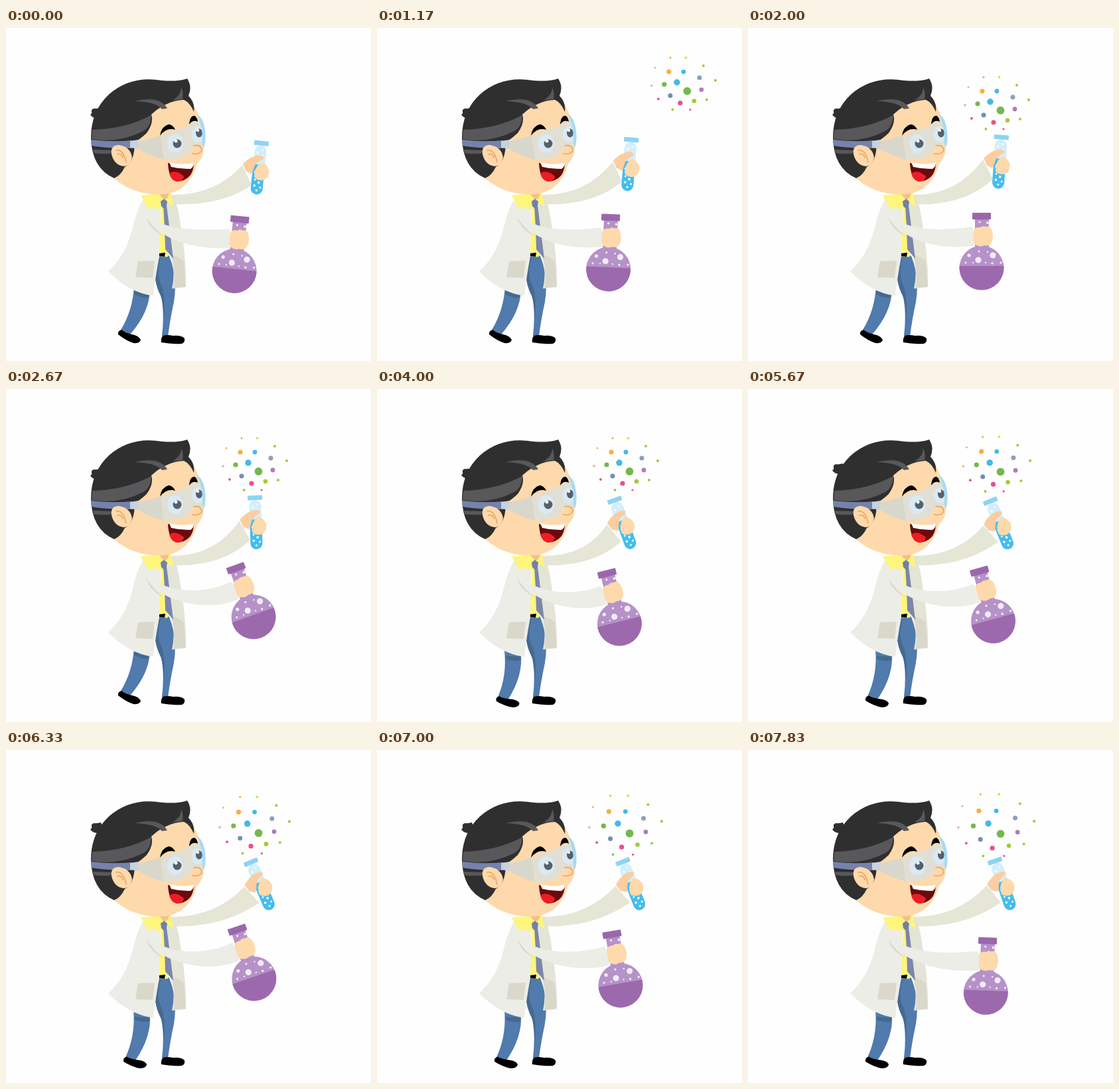
These frames come from a looping animation (550 px wide and 501 px high, 8000 ms). An HTML page:

```html
<!DOCTYPE html>
<html lang="en">
<head>
<meta charset="utf-8">
<title>Scientist</title>
<style>
  html, body { margin: 0; width: 100%; height: 100%; overflow: hidden; background: #fefefe; }
  svg { display: block; width: 100vw; height: 100vh; }
  .skin { fill: #fed9ab; }
  .hair { fill: #2f2f30; }
  .streak { fill: #58585a; }
  .coat { fill: #ecede6; }
  .fold { fill: #d9d8cb; }
  .jeans { fill: #517aad; }
  .line { fill: none; stroke: #e9a45c; stroke-width: 1.6; stroke-linecap: round; }
</style>
</head>
<body>
<svg viewBox="0 0 550 501">
  <g id="backLeg">
    <path class="jeans" d="M193 388L217 394Q216 428 187 461L173 454Q191 425 193 388Z"/>
    <path fill="#46698f" d="M193 396L216 400L214 406Q202 406 193 400Z"/>
    <path d="M174 454Q168 456 169 461Q180 470 192 474Q202 475 203 469Q200 463 190 461Q181 459 174 454Z"/>
  </g>
  <path class="jeans" d="M228 343Q238 338 246 343Q259 375 253 412Q247 440 244 464L235 463Q239 430 234 405Q226 390 224 370Z"/>
  <path fill="#46698f" d="M229 346L233 346Q225 372 235 389Q241 410 238 440Q238 415 233 402Q224 385 225 370Z"/>
  <path d="M236 463Q233 468 234 473Q250 476 265 475Q270 473 269 467Q264 462 252 463Q243 461 236 463Z"/>

  <path id="backArm" fill="#e6e6d7"/>

  <g id="tube">
    <rect x="-13" y="-38" width="18" height="74" rx="9" fill="#d3eefb"/>
    <path fill="#45bdee" d="M-13 -9H5V27A9 9 0 0 1 -13 27Z"/>
    <rect x="-15" y="-45" width="22" height="7" rx="1" fill="#8dd3f4"/>
    <g id="tubeBubbles" fill="#fff"></g>
  </g>
  <g id="tubeHand">
    <path fill="#fbcda0" d="M-28 -9Q-15 -24 0 -23Q5 -21 1 -17Q-10 -12 -11 -4Q-12 2 -15 6Q-18 3 -23 2Z"/>
    <path class="skin" d="M-8 -3Q-7 -8 0 -13Q8 -11 12 -1Q12 12 3 14Q-5 15 -9 11Q-11 7 -9 4Q-11 0 -8 -3Z"/>
  </g>

  <path fill="#e4e4d7" d="M242 256L251 251Q259 262 264 303Q272 350 271 390L250 392Q256 365 248 343Z"/>
  <path class="fold" d="M249 341Q262 345 268 351L271 389L253 391Q256 365 249 341Z"/>
  <path fill="#fef57b" d="M205 253L248 247L253 268L242 263L244 344Q235 345 230 342L234 272L212 272Z"/>
  <path class="coat" d="M208 256Q198 270 191 300Q181 342 154 366Q185 398 222 403Q225 375 231 344L233 272L226 272Z"/>
  <path fill="#fef57b" d="M203 252L215 273L238 257L251 267L247 248Z"/>
  <path fill="#f3c089" d="M227 246L246 246Q245 258 238 258Z"/>
  <path d="M231 339L240 338L239 344L231 343Z"/>
  <path fill="#7b86ab" d="M237 266H242L252 347L240 333L239 300Z"/>
  <path fill="#7180a8" d="M233 261L238 257L243 261L242 268L238 272L234 268Z"/>
  <path class="fold" d="M199 351L224 350L221 376L195 375Z"/>

  <path id="tuft" class="hair" d="M143 120Q135 122 133 121Q128 122 129 126Q130 129 127 130Q129 135 137 136L147 132Z"/>
  <path class="skin" d="M163 226Q180 242 206 248Q235 254 255 246Q279 236 288 204Q299 193 298 178Q298 140 281 112Q262 98 230 112L180 165Z"/>
  <path class="hair" d="M163 226Q129 211 128 165Q128 125 155 100Q188 71 235 79Q262 81 273 76Q281 88 275 102Q285 112 283 126Q277 112 268 108Q242 109 219 130Q223 143 212 158Q200 169 194 171Q194 202 179 209Q173 222 163 226Z"/>
  <path class="streak" d="M130 153Q180 152 219 131Q218 149 207 155Q170 174 129 167Z"/>
  <path class="streak" d="M194 110Q232 101 243 121L235 122Q226 111 194 110Z"/>
  <path class="streak" d="M264 89Q264 102 250 109L266 107Q268 97 264 89Z"/>
  <path class="streak" d="M131 183L160 184L157 189Q140 190 132 188Z"/>
  <path fill="#7582ac" d="M128 168Q160 172 190 169V181Q150 181 129 177Z"/>
  <path fill="#c7d2de" d="M187 170L200 168V182L187 180Z"/>
  <path class="skin" d="M159 190Q157 176 170 176Q188 179 190 195Q187 208 177 208Q163 206 159 190Z"/>
  <path class="line" d="M166 184Q177 182 181 202M168 190Q174 188 176 195"/>

  <path fill="#d8d7cc" d="M199 171L233 162L238 198Q215 192 199 182Z"/>
  <path fill="#e1dfd3" d="M233 162Q270 150 291 138Q301 159 297 178Q282 174 275 190Q258 200 238 198Z"/>
  <ellipse cx="255" cy="174" rx="12" ry="14" fill="#d9eaf4"/>
  <ellipse cx="289" cy="160" rx="9.5" ry="12" fill="#d9eaf4"/>
  <g fill="#56606a"><circle cx="258" cy="174" r="6.5"/><ellipse cx="291" cy="158" rx="5" ry="6.5"/></g>
  <g fill="#fff"><circle cx="256" cy="170" r="2.5"/><circle cx="289" cy="154" r="2.2"/></g>
  <path id="rim" fill="#a5dbf4" d="M288 130Q297 134 300 154Q302 171 298 180Q295 174 296 162Q295 144 288 130Z"/>
  <path d="M232 162Q234 148 245 145Q251 145 255 153Q242 149 232 162ZM276 145Q277 132 284 132Q288 134 289 141Q282 137 276 145Z"/>
  <ellipse class="skin" cx="287" cy="183" rx="8" ry="7.5"/>
  <path class="line" d="M283 177Q294 175 295 184Q292 191 281 189"/>
  <path fill="#690b0d" d="M244 203Q265 208 283 204Q282 229 258 231Q245 228 244 203Z"/>
  <path fill="#ee1d25" d="M246 219Q255 212 268 223Q268 230 258 231Q249 230 246 219Z"/>
  <path fill="#fff" d="M246 202Q264 207 283 203Q283 209 278 212Q258 211 249 209Z"/>

  <path id="frontArm" class="coat"/>
  <path class="fold" d="M212 286Q216 302 238 314Q222 301 212 286Z"/>

  <g id="flask">
    <rect x="-12" y="-27" width="21" height="45" fill="#b592c8"/>
    <circle cx="-2" cy="47" r="33.5" fill="#b592c8"/>
    <path fill="#9c69ad" d="M-35.4 44H31.4A33.5 33.5 0 1 1 -35.4 44Z"/>
    <rect x="-16" y="-36" width="28" height="10" rx="1" fill="#9b67ac"/>
    <g id="flaskBubbles" fill="#f3ebf7"></g>
    <path class="skin" d="M-14 -10Q-11 -15 -4 -14Q0 -17 4 -15Q10 -17 13 -11Q17 0 13 9Q9 15 2 13Q-4 16 -9 13Q-14 12 -14 6Z"/>
  </g>
  <g id="dots"></g>
</svg>
<script>
const LOOP = 8000, STEP = 500 / 3;
const $ = id => document.getElementById(id);

// time, flask x y angle, tube x y angle, back-leg turn and drop, tuft lift
const poses = [
  [0,    351, 319,   6, 384.5, 215,   6,  0, 0,   0],
  [2000, 354, 314,   0, 383,   206,   4,  0, 0,   0],
  [2670, 359, 298, -20, 380.5, 205,  -2,  0, 0,   0],
  [3670, 356, 305, -15, 377,   205, -16,  0, 0,   0],
  [4000, 356, 307, -14, 376,   205, -20, -9, 4,  -1],
  [4830, 357, 309, -11, 379,   206, -21, -7, 4,  -4],
  [6330, 360.5, 299, -19, 389, 205.5, -23, -7, 4, -11],
  [7830, 362, 318,   2, 389.5, 205, -19, -7, 4, -11]
];

const dots = [
  [355, 74, 1.5, '#f9a44a'], [378.5, 74, 2, '#f5d94a'], [405, 86, 2, '#a6c936'], [332, 89, 1.5, '#f6ae72'],
  [353, 95, 3.6, '#f9ae40'], [375, 95, 3.4, '#42b9e9'], [399, 104, 3.5, '#8aa0bd'], [423, 108, 2.1, '#a6c936'],
  [346, 114, 3.6, '#74b84c'], [365, 111, 4.7, '#42b9e9'], [327, 116, 2, '#f2bd9e'], [380.5, 124, 5.9, '#74b84c'],
  [402, 122, 3.4, '#b07cba'], [355, 131, 3.5, '#738eb4'], [337, 136, 2, '#ec5794'], [370, 142, 3.6, '#ec4f8c'],
  [391, 139, 3.3, '#a6c936'], [410, 137, 2, '#a6c936'], [358.5, 152, 2, '#a6c936'], [385, 152, 1.6, '#ec4f8c']
];
const flaskBubbles = [
  [-7, 35, 4.6], [15, 28, 4.6], [-21, 28, 2.6], [-6, 22, 1.6], [-26, 39, 1.6], [27, 39, 1.7], [4, 39, 1.2],
  [14, 40, 1.7], [-15, 39, 1.2], [7, 23, 1.3], [7, -21, 2], [-5, -22, 1.6]
];
const tubeBubbles = [
  [-8, -27, 1.6], [-1, -31, 1.2], [0, -22, 1.8], [-8, -15, 1.3], [-9, 3, 1.7], [-8, 14, 1.4], [-2, 18, 1.9],
  [-8, 23, 1.8], [1, 25, 1.5], [-4, 30, 1.6], [0, 13, 1.1]
];

function addCircle(parent, [x, y, r, color]) {
  const c = document.createElementNS('http://www.w3.org/2000/svg', 'circle');
  c.setAttribute('cx', x);
  c.setAttribute('cy', y);
  c.setAttribute('r', r);
  if (color) c.setAttribute('fill', color);
  parent.append(c);
  return c;
}
const dotNodes = dots.map(d => addCircle($('dots'), d));
flaskBubbles.forEach(b => addCircle($('flaskBubbles'), b));
tubeBubbles.forEach(b => addCircle($('tubeBubbles'), b));

const progress = (t, from, to) => Math.min(1, Math.max(0, (t - from) / (to - from)));

function poseAt(t) {
  const i = Math.max(1, poses.findIndex(p => p[0] >= t));
  const a = poses[i - 1], b = poses[i], k = progress(t, a[0], b[0]);
  return a.map((v, n) => v + (b[n] - v) * k);
}

// Maps local points into a hand at (x, y) turned by some degrees.
function handFrame(x, y, degrees) {
  const r = degrees * Math.PI / 180, c = Math.cos(r), s = Math.sin(r);
  return (px, py) => `${x + px * c - py * s} ${y + px * s + py * c}`;
}

function place(id, x, y, angle) {
  $(id).setAttribute('transform', `translate(${x} ${y}) rotate(${angle})`);
}

function drawDots(t) {
  $('dots').style.display = t < 820 ? 'none' : '';
  const slide = 1 - progress(t, 830, 2000);
  const spread = 1 + 0.19 * progress(t, 4900, 7830);
  dots.forEach(([x, y], i) => {
    dotNodes[i].setAttribute('cx', 380 + (x - 380) * spread + 122 * slide);
    dotNodes[i].setAttribute('cy', 113 + (y - 113) * spread - 41 * slide);
  });
}

function draw(t) {
  const [, fx, fy, fa, tx, ty, ta, legTurn, legDrop, tuftLift] = poseAt(t);
  place('flask', fx, fy, fa);
  place('tube', tx, ty, ta);
  place('tubeHand', tx, ty, ta * 0.6);
  place('tuft', 0, tuftLift, 0);
  $('backLeg').setAttribute('transform', `translate(0 ${legDrop}) rotate(${legTurn} 205 395)`);

  const front = handFrame(fx, fy, fa), back = handFrame(tx, ty, ta * 0.6);
  $('frontArm').setAttribute('d', `M210 278C240 308 ${front(-60, -9)} ${front(-16, -15)}
    Q${front(-11, 0)} ${front(-14, 14)}C${front(-50, 18)} 250 330 214 290Z`);
  $('backArm').setAttribute('d', `M248 251Q315 252 ${back(-29, -7)}L${back(-13, 22)}Q325 268 252 265Z`);
  drawDots(t);
}

function tick(now) {
  const step = Math.floor((now % LOOP + 4) / STEP);
  draw(step < 2 ? 0 : Math.min(7830, step * STEP));
  requestAnimationFrame(tick);
}
draw(0);
requestAnimationFrame(tick);
</script>
</body>
</html>
```
